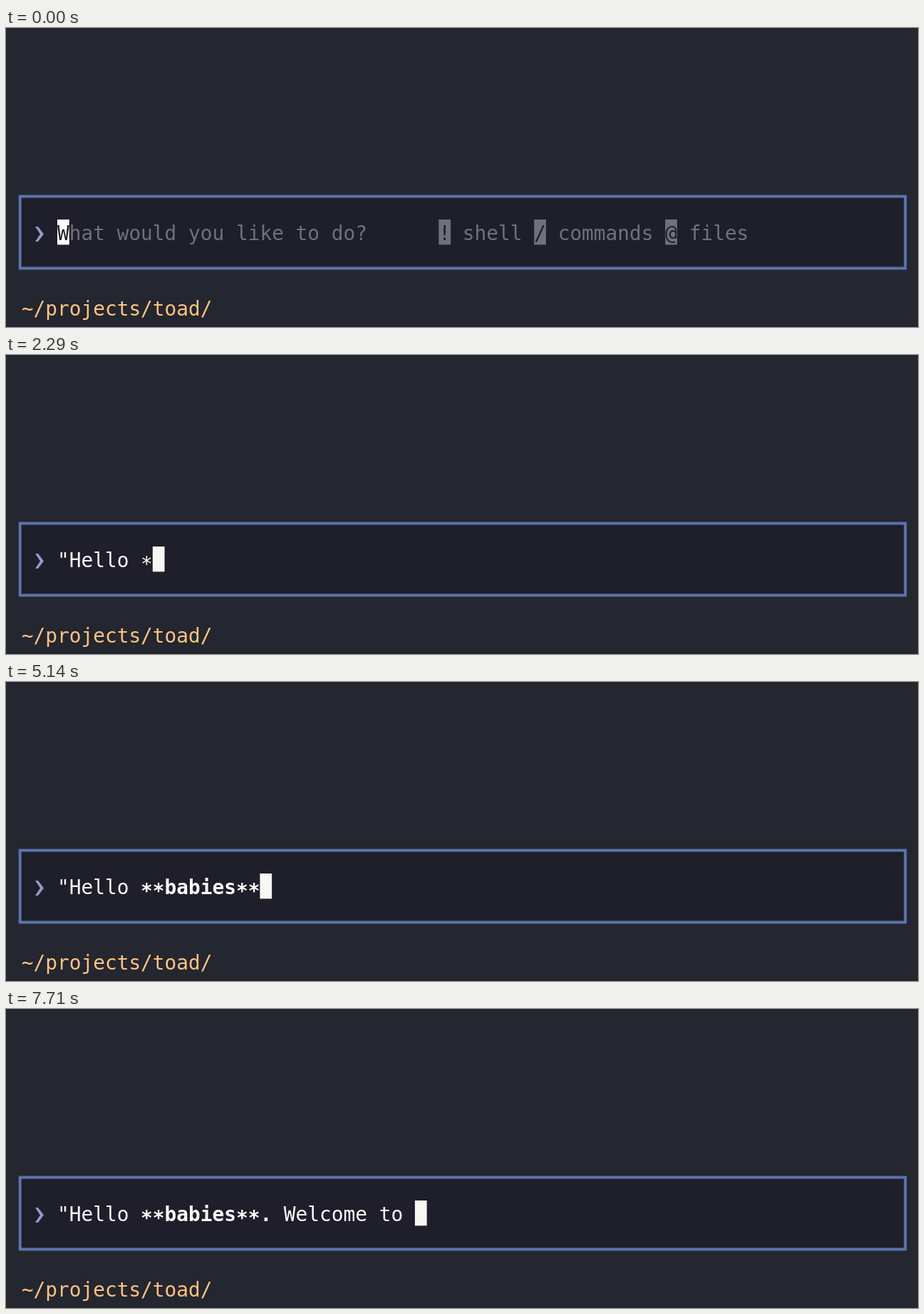
These frames come from a looping animation (1280 px wide and 420 px high, 8 s). An HTML page with a canvas:

```html
<!DOCTYPE html>
<html lang="en">
<head>
<meta charset="utf-8">
<title>Terminal prompt</title>
<style>
  html, body { margin: 0; width: 100%; height: 100%; overflow: hidden; background: #242630; }
  canvas { display: block; width: 1280px; height: 420px; }
</style>
</head>
<body>
<canvas id="stage" width="1280" height="420"></canvas>
<script>
const ctx = document.getElementById('stage').getContext('2d');
const LOOP = 8000, FRAME = 1000 / 7, BLINK = 500;
const CELL = 16.73, LEFT = 72, TOP = 269, ROW = 35.4;
const INPUT_Y = 298, PATH_Y = 403.5;
const FACE = '27.8px "DejaVu Sans Mono", "Noto Sans Mono", monospace';
const INK = { page: '#242630', edge: '#25282d', box: '#1e1f2a', border: '#5b73ab',
              dim: '#707179', text: '#fcfcfc', cursor: '#f8f8f2',
              prompt: '#949bcb', path: '#ffc482' };

// Bursts of typing at an even pace
const BURSTS = [
  { text: '"', at: 60 },
  { text: 'Hello', at: 1100 },
  { text: ' ', at: 1950 },
  { text: '**', at: 2200 },
  { text: 'babies', at: 2680 },
  { text: '**', at: 4840 },
  { text: '. ', at: 6100 },
  { text: 'Welcome to ', at: 6540, pace: 116 },
];
const KEYS = BURSTS.flatMap(({ text, at, pace = 140 }) =>
  [...text].map((ch, i) => ({ ch, at: at + i * pace })));
const MESSAGE = KEYS.map(key => key.ch).join('');
const BOLD_FROM = MESSAGE.indexOf('**');
const BOLD_END = MESSAGE.lastIndexOf('**') + 2;

const colX = col => LEFT + col * CELL;

function block(col, color) {
  ctx.fillStyle = color;
  ctx.fillRect(colX(col), TOP, CELL, ROW);
}

function glyph(ch, col, base, color, bold) {
  ctx.font = (bold ? 'bold ' : '') + FACE;
  ctx.fillStyle = color;
  ctx.fillText(ch, colX(col + 0.5), base + (ch === '*' ? 5 : 0));
}

function write(str, col, base, color, isBold = () => false) {
  [...str].forEach((ch, i) => {
    if (ch !== ' ') glyph(ch, col + i, base, color, isBold(i));
  });
}

function drawPrompt() {
  ctx.fillStyle = INK.prompt;
  ctx.beginPath();
  for (const [x, y] of [[41, 279], [45, 279], [53, 289.5], [45, 300], [41, 300], [48, 289.5]])
    ctx.lineTo(x, y);
  ctx.fill();
}

function drawFrame() {
  ctx.fillStyle = INK.edge;
  ctx.fillRect(0, 0, 1280, 420);
  ctx.fillStyle = INK.page;
  ctx.fillRect(5, 0, 1270, 420);

  ctx.beginPath();
  ctx.rect(19.7, 236.5, 1242.5, 101);
  ctx.fillStyle = INK.box;
  ctx.fill();
  ctx.strokeStyle = INK.border;
  ctx.lineWidth = 4;
  ctx.stroke();

  drawPrompt();
  write('~/projects/toad/', -3, PATH_Y, INK.path);
}

function drawPlaceholder() {
  block(0, '#ffffff');
  glyph('W', 0, INPUT_Y, INK.box);
  write('hat would you like to do?', 1, INPUT_Y, INK.dim);
  let col = 32;
  for (const [key, label] of [['!', 'shell'], ['/', 'commands'], ['@', 'files']]) {
    block(col, INK.dim);
    glyph(key, col, INPUT_Y, INK.box);
    write(label, col + 2, INPUT_Y, INK.dim);
    col += label.length + 3;
  }
}

function drawInput(t) {
  const typed = KEYS.filter(key => key.at <= t);
  const count = typed.length;
  if (!count) return drawPlaceholder();
  write(MESSAGE.slice(0, count), 0, INPUT_Y, INK.text,
        i => count >= BOLD_END && i >= BOLD_FROM && i <= BOLD_END);
  // The blink restarts with every key
  const idle = t - typed[count - 1].at;
  if (Math.floor(idle / BLINK) % 2 === 0) block(count, INK.cursor);
}

function draw(t) {
  ctx.textAlign = 'center';
  ctx.textBaseline = 'alphabetic';
  drawFrame();
  // The screen refreshes seven times a second
  drawInput(Math.floor((t + 5) / FRAME) * FRAME);
}

let start;
function tick(now) {
  start ??= now;
  draw((now - start) % LOOP);
  requestAnimationFrame(tick);
}
draw(0);
requestAnimationFrame(tick);
</script>
</body>
</html>
```
